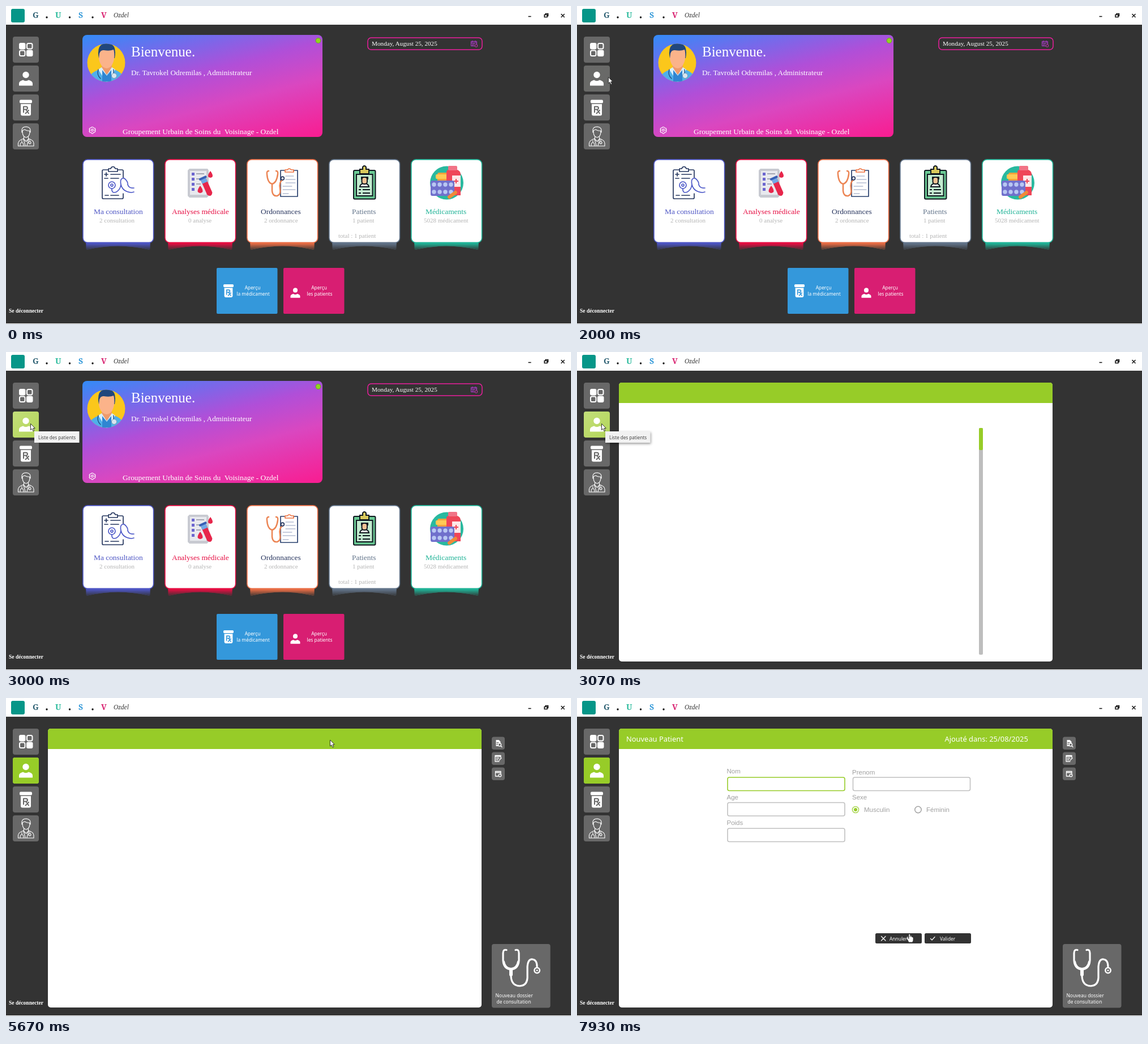
Animation, 998 px wide and 561 px high, one loop 8 s. Source, as an HTML page:

```html
<!DOCTYPE html>
<html lang="fr">
<head>
<meta charset="utf-8">
<title>Accueil patients</title>
<style>
html, body { margin: 0; width: 100%; height: 100%; overflow: hidden; background: #333; }
svg { display: block; width: 100%; height: 100%; }
text { white-space: pre; fill: #fff; }
.serif { font: 13.4px "Liberation Serif", serif; }
.head { font: 11.2px "Noto Serif", serif; fill: #97cc28; }
.sans { font: 8.4px "Noto Sans", sans-serif; }
.cell { font: 11px "Noto Sans", sans-serif; }
.title { font: 12.9px "Noto Sans", sans-serif; }
.label text { font: 11.5px "Liberation Sans", sans-serif; fill: #a0a0a0; }
.sub { font-size: 11px; fill: #b5b5b5; }
.brand { font: 900 14px "Noto Serif", serif; }
.line { fill: none; stroke-linecap: round; stroke-linejoin: round; }
.white { stroke: #fff; }
.box { fill: #686868; }
.green { fill: #97cc28; }
.field { fill: #fff; stroke: #c0c0c0; stroke-width: 1.6; }
</style>
</head>
<body>
<svg viewBox="0 0 998 561" preserveAspectRatio="none">
<defs>
  <linearGradient id="sky" gradientUnits="userSpaceOnUse" x1="170" y1="35" x2="243" y2="314">
    <stop offset="0" stop-color="#2b8ff9"/><stop offset=".24" stop-color="#7769ea"/>
    <stop offset=".43" stop-color="#b04fd8"/><stop offset=".65" stop-color="#da47c0"/><stop offset="1" stop-color="#f91c90"/>
  </linearGradient>
  <linearGradient id="pale" x2="1" y2="1"><stop stop-color="#c3de7a"/><stop offset="1" stop-color="#b3d65a"/></linearGradient>
  <linearGradient id="fade" x2="0" y2="1"><stop offset=".2" stop-color="#333" stop-opacity="0"/><stop offset="1" stop-color="#333" stop-opacity=".9"/></linearGradient>
  <clipPath id="face"><circle cx="177" cy="100" r="33.5"/></clipPath>
  <symbol id="person" viewBox="0 0 24 25" overflow="visible">
    <circle cx="12" cy="6" r="5.700"/><path d="M0 25V21Q0 17 7 15Q12 18.500 17 15Q24 17 24 21V25Z"/>
  </symbol>
  <symbol id="bottle" viewBox="0 0 22 28" overflow="visible">
    <g fill="#fff"><rect width="22" height="6" rx="2"/><path d="M2 7.500H20V25Q20 28 17 28H5Q2 28 2 25Z"/></g>
    <path d="M7 22V12H11Q14 12 14 14.500T11 17H7M11 17L16 24M16 18.500L10.500 24" class="line" stroke="currentColor" stroke-width="2"/>
  </symbol>
</defs>

<rect width="998" height="561" fill="#333"/>
<rect width="998" height="33" fill="#fff"/>
<rect y="560" width="998" height="1" fill="#fff"/>
<rect x="9" y="5" width="24" height="24" rx="3" fill="#069688"/>
<g class="brand">
  <text x="47" y="21" style="fill:#2c5f72">G</text><text x="87" y="21" style="fill:#25b99a">U</text>
  <text x="128" y="21" style="fill:#2f97d8">S</text><text x="168" y="21" style="fill:#d81e6e">V</text>
  <g fill="#111"><circle cx="72" cy="20" r="1.700"/><circle cx="112.500" cy="20" r="1.700"/><circle cx="153" cy="20" r="1.700"/></g>
</g>
<text x="190" y="20" class="serif" style="font-style:italic;font-size:11.500px;fill:#333">Ozdel</text>
<path d="M922.500 18.500h5M951 15.500h5v4h-5zM953 15v-1.500h4.500v4h-1.500M980.500 14l6 6m0-6l-6 6" fill="none" stroke="#111" stroke-width="1.500"/>

<g id="side">
  <g class="box"><rect x="12" y="54" width="46" height="46" rx="4"/><rect x="12" y="105" width="46" height="46" rx="4"/>
    <rect x="12" y="156" width="46" height="46" rx="4"/><rect x="12" y="207" width="46" height="46" rx="4"/></g>
  <rect id="hover" x="12" y="105" width="46" height="46" rx="4" fill="url(#pale)"/>
  <rect id="active" x="12" y="105" width="46" height="46" rx="4" class="green"/>
  <g fill="#fff"><rect x="23" y="65" width="11.500" height="11.500" rx="3"/><rect x="36" y="77.500" width="11.500" height="11.500" rx="3"/></g>
  <g class="line white" stroke-width="2"><rect x="37" y="66" width="9.500" height="9.500" rx="2.500"/><rect x="24" y="78.500" width="9.500" height="9.500" rx="2.500"/></g>
  <use href="#person" x="23" y="115.500" width="24" height="25" fill="#fff"/>
  <use href="#bottle" x="24" y="165.500" width="22" height="28" color="#686868"/>
  <g class="line white" stroke-width="1.100">
    <path d="M28 223V218Q29 213 36 213Q43 214 43 219V223M28 221Q31 218 33 218Q38 221 43 220M29 221Q29 231 35.500 232Q42 231 42 221M31.500 231V235L35.500 239L39.500 235V231"/>
    <path d="M31 234Q22 237 21.500 242V247H49V242Q49 237 40 234M31 235L34 246M40 235L37 246M28 237V241M25 246Q25 241 28 241T31 246M42 236V239"/><circle cx="42" cy="241" r="2"/>
  </g>
  <text x="5" y="541" class="serif" style="font-weight:bold;font-size:9.500px">Se déconnecter</text>
</g>

<g id="dashboard">
  <rect x="135" y="51" width="424" height="180" rx="8" fill="url(#sky)"/>
  <circle cx="551.500" cy="61" r="4.500" fill="#8fd61f" stroke="#6b9c32"/>
  <g clip-path="url(#face)">
    <circle cx="177" cy="100" r="34" fill="#fbc71b"/>
    <path d="M164 92Q159 67 177 65Q197 65 192 92Z" fill="#21477c"/>
    <path d="M169 100H187V114L178 124L169 114Z" fill="#ee9a6c"/>
    <path d="M165 84Q167 77 173 78Q183 80 190 77Q192 82 191 93Q188 109 178 110Q167 109 164 93Z" fill="#fbb38a"/>
    <path d="M142 136Q146 117 168 111L178 121L188 111Q209 117 212 136Z" fill="#4fb0ea"/>
    <path d="M163 112L169 108L178 122L187 108L193 112L178 136Z" fill="#d8effc"/>
    <path d="M170 113L178 123L186 113V134H170Z" fill="#2f86d2"/>
    <path d="M163 112Q160 122 167 128M190 112V120" class="line" stroke="#244c80" stroke-width="1.400"/>
    <circle cx="191" cy="123" r="4.500" fill="#d8e6f0" stroke="#8097ae"/>
  </g>
  <g class="serif">
    <text x="221" y="88.500" style="font-size:25px">Bienvenue.</text>
    <text x="221" y="122" style="font-size:13.200px">Dr. Tavrokel Odremilas , Administrateur</text>
    <text x="206" y="226">Groupement Urbain de Soins du  Voisinage - Ozdel</text>
  </g>
  <g class="line white" stroke-width="1.200"><circle cx="152.500" cy="219" r="1.800"/><path d="M150.500 214.500L151.500 213.500H153.500L154.500 215L157 215.500L158 218L156.500 219L158 220.500L156.500 223L154.500 223L153.500 225H151.500L150.500 223L148 223L147 220.500L148.500 219L147 217.500L148 215.500Z"/></g>
  <rect x="639" y="56" width="202" height="21" rx="6" fill="#333" stroke="#ea1e9d" stroke-width="1.500"/>
  <text x="646" y="70" class="serif" style="font-size:11.200px">Monday, August 25, 2025</text>
  <path d="M821.500 62.500h10v8h-10zM821.500 65h10M824 61v3M829 61v3M823 67h5M823 69h3" fill="none" stroke="#b13ad0"/><circle cx="830.500" cy="70" r="2.300" fill="#333" stroke="#d030b8"/>
  <g id="cards"></g>
  <g id="icons">
    <g class="line" stroke="#26375f" stroke-width="1.700">
      <path d="M181 289H172Q170 289 170 291V338Q170 340 172 340H205Q207 340 207 338V331M197 289H205Q207 289 207 291V303M181 292V287H185Q186 283.500 189 283.500T193 287H197V292ZM174 297h6M177 294v6M185 297h17M174 304h6M185 304h14M175 334h6M185 334h14"/>
      <path d="M187 322V325Q188 331 195 328Q202 324 203 315M203 315Q201 305 206 304L209 304M203 315Q206 328 222 329L226 328M209 304Q216 310 215 315Q217 322 226 321" stroke="#4c58c8"/><circle cx="187" cy="316" r="6" stroke="#4c58c8"/><circle cx="187" cy="316" r="2" stroke="#4c58c8"/>
    </g>
    <g><path d="M324 287H356L358 290V335L355 338H324L321 335V290Z" fill="#c8cad1"/><rect x="325" y="291" width="29" height="42" fill="#e8e9ee"/>
      <path d="M328 294h5v5h-5zM328 303h5v5h-5zM328 312h5v5h-5zM328 321h5v5h-5z" fill="#6d66cf"/>
      <path d="M336 296h14M336 305h10M336 314h8" stroke="#a5a7b3" stroke-width="2"/>
      <g transform="rotate(-24 355 320)"><path d="M350 302h10v30q-5 8-10 0z" fill="#e7264b"/><path d="M350 302h10v9h-10z" fill="#70a9e6"/><rect x="348" y="300" width="14" height="4" rx="1" fill="#3860b6"/></g>
      <path d="M361 291q8 11 0 12q-8-1 0-12M343 317q9 12 0 13q-9-1 0-13" fill="#e7264b"/></g>
    <g class="line" stroke-width="1.700"><path d="M492 290H485V336H515V290H508" stroke="#29406e"/><path d="M493 293V289H497Q500 285 504 289H508V293Z" stroke="#ed7341"/>
      <path d="M494 300h14M494 306h17M494 312h17M489 318h16M489 324h22M489 331h10" stroke="#8d9abb" stroke-width="1"/>
      <path d="M464 291Q460 291 461 297Q462 312 470 314Q478 312 480 297Q481 291 477 291M470 314V326Q471 336 479 335Q486 333 484 322Q482 311 488 307" stroke="#ec8554" stroke-width="2.500"/><circle cx="488.500" cy="304" r="2.800" stroke="#26375f"/></g>
    <g stroke="#101820" stroke-width="2"><rect x="614" y="290" width="38.500" height="50.500" rx="2" fill="#6ac994"/><rect x="619" y="297" width="28.500" height="38" fill="#c3ecd0"/><path d="M625 296V288H630V284Q633 280 636 284V288H641V296Z" fill="#d9c95c"/>
      <path d="M625 319Q626 313 633 313Q640 313 641 319Z" fill="#f6f6ee"/><rect x="628.500" y="302" width="9.500" height="12" rx="4" fill="#f0c294"/><path d="M628 306V302H639V306" fill="none"/><path d="M623 324h4M630 324h13M623 330h4M630 330h13" fill="none"/></g>
    <g><circle cx="778.500" cy="312" r="29.500" fill="#29b99f"/><rect x="762" y="294" width="22" height="25" rx="3" fill="#f5a23c"/><rect x="759" y="297" width="23" height="8" rx="2" fill="#ffca55"/><path d="M778 293Q778 289 782 289H797Q803 291 803 297V334H778Z" fill="#ef4658"/><rect x="781" y="282" width="16" height="8" rx="2" fill="#f17386"/><rect x="788" y="299" width="15" height="20" fill="#ffe8e8"/><path d="M791 309h8M795 305v8" stroke="#ef4658" stroke-width="2"/>
      <rect x="750" y="308" width="42" height="27" rx="3" fill="#7070cc"/><g id="pills" fill="#b8c7f3"></g><path d="M783 337l11-8" class="line" stroke="#f08a38" stroke-width="6"/></g>
  </g>
  <rect x="372" y="462" width="107.500" height="81" rx="2" fill="#3498db"/><rect x="490" y="462" width="107.500" height="81" rx="2" fill="#d81e72"/>
  <use href="#bottle" x="384" y="491" width="18" height="23" color="#3498db"/><use href="#person" x="502.500" y="497" width="17" height="18" fill="#fff"/>
  <g class="sans" text-anchor="middle"><text x="435.500" y="500">Aperçu</text><text x="436.500" y="511">la médicament</text><text x="553" y="500">Aperçu</text><text x="554" y="511">les patients</text></g>
</g>

<g id="page">
  <rect x="74" y="54" width="766" height="492" rx="5" fill="#fff"/>
  <path d="M74 90V59Q74 54 79 54H835Q840 54 840 59V90Z" class="green"/>
  <g id="scroll"><rect x="710" y="134" width="7" height="400" rx="2" fill="#bebebe"/><rect x="710" y="134" width="7" height="39" rx="2" class="green"/></g>
</g>

<g id="tools">
  <g class="box"><rect x="858" y="68.500" width="23" height="22.500" rx="4"/><rect x="858" y="95.500" width="23" height="22.500" rx="4"/><rect x="858" y="122.500" width="23" height="22.500" rx="4"/><rect x="858" y="434" width="103.500" height="112.500" rx="4"/></g>
  <path d="M865.500 74h5l3 3v8h-8z" fill="#fff"/><g class="line white" stroke-width="1.300">
    <path d="M867 79h3M867 82h3" stroke="#686868"/><circle cx="872" cy="82.500" r="2.600" fill="#686868"/><path d="M874 84.500l2 2M874 106v-4.500h-10v10.500h7M864 103h10M866 106h5M866 109h3M871 110l4-4M874 135v-5.500h-9.500v8.500h5M864.500 131.500h9.500"/><circle cx="872.500" cy="136.500" r="2.300"/></g>
  <g class="line white"><path d="M884 444.500Q878 443 878 450V463Q879 478 892 479Q905 478 906 463V450Q906 443 900 444.500M892 480V491Q893 508 908 508Q922 507 921 489V474Q922 460 930 461Q938 462 938 474" stroke-width="3.200"/><path d="M892 480v8" stroke-width="6"/><path d="M879 465Q881 477 892 478Q903 477 905 465" stroke-width="4"/><circle cx="938" cy="480.500" r="4.700" stroke-width="2.500"/></g><circle cx="938" cy="480.500" r="1.500" fill="#fff"/>
  <g class="sans"><text x="864.500" y="528">Nouveau dossier</text><text x="866.500" y="539">de consultation</text></g>
</g>

<g id="list">
  <text x="87" y="76.500" class="title">Liste des patients</text>
  <use href="#person" x="532" y="65" width="13" height="12.500" fill="#fff"/><text x="549" y="74" class="sans">Nouveau patient</text>
  <path d="M622.500 59V83" stroke="#fff"/><rect x="633" y="60" width="196" height="22" rx="11" fill="#fff"/>
  <g class="line" stroke="#b0b0b0" stroke-width="1.600"><circle cx="643" cy="69.500" r="3.300"/><path d="M645.500 72l3.500 3.500"/></g>
  <text x="658" y="73.500" class="sans" style="fill:#c2c2c2">Nom uniquement</text>
  <g id="rows">
    <text x="88" y="119.500" class="title" style="fill:#97cc28">1 résultats</text>
    <rect x="74" y="161" width="766" height="29" class="green"/><use href="#person" x="84" y="171" width="9" height="9.500" fill="#61733c"/>
    <g id="table"></g>
  </g>
</g>

<g id="form">
  <text x="87" y="76.500" class="title">Nouveau Patient</text><text x="649.500" y="76.500" class="title">Ajouté dans: 25/08/2025</text>
  <g class="label"><text x="264.500" y="133">Nom</text><text x="486" y="134.500">Prenom</text><text x="264.500" y="179">Age</text><text x="486" y="179">Sexe</text><text x="264.500" y="224">Poids</text><text x="507" y="201">Musculin</text><text x="617" y="201">Féminin</text></g>
  <g class="field"><rect x="266" y="140" width="207" height="23.500" rx="3" style="stroke:#97cc28"/><rect x="487.500" y="140" width="207" height="23.500" rx="3"/><rect x="266" y="184.500" width="207" height="23.500" rx="3"/><rect x="266" y="230" width="207" height="23.500" rx="3"/></g>
  <circle cx="492" cy="197" r="5.600" fill="#fff" stroke="#a8d550" stroke-width="1.500"/><circle cx="492" cy="197" r="3" class="green"/><circle cx="602.500" cy="197" r="5.700" fill="#fff" stroke="#a0a0a0" stroke-width="1.500"/>
  <rect x="527" y="415" width="82" height="18" rx="2.500" fill="#333"/><rect x="614" y="415" width="82" height="18" rx="2.500" fill="#333"/>
  <path d="M537.500 420.500l7.500 7.500m0-7.500l-7.500 7.500M624.500 424.500l2.500 2.500 5-5.500" class="line white" stroke-width="1.200"/>
  <text x="552" y="427.500" class="sans">Annuler</text><text x="641" y="427.500" class="sans">Valider</text>
  <rect id="caret" x="274" y="145" width="1" height="11.500" fill="#222"/>
</g>

<g id="tip"><rect x="50" y="140" width="79.500" height="20" fill="#f2f2f2"/><text x="57" y="153.500" class="sans" style="font-size:8.100px;fill:#444">Liste des patients</text></g>
<g id="cursor">
  <path id="arrow" d="M.5 .5V11.500L3 9.200L5 13.500L6.800 12.700L5 8.500H8.300Z" fill="#fff" stroke="#222" stroke-width=".9"/>
  <path id="hand" d="M0 1Q1.300-.5 2.400 1V5.500Q4-.1 5 5.500L6.800 5.800L8 7Q8.500 12 6.500 15H0Q-1.500 11-3.500 9Q-3-.1 0 9Z" fill="#fff" stroke="#333" stroke-width=".7"/>
</g>
</svg>
<script>
const el = id => document.getElementById(id);
const LOOP = 8000, FPS = 15;

const cards = [
  ['#4d55c4', 'Ma consultation', 155, '2 consultation', 165],
  ['#e60d42', 'Analyses médicale', 293, '0 analyse', 322],
  ['#e96d45', 'Ordonnances', 450, '2 ordonnance', 456, '#29365f'],
  ['#62748a', 'Patients', 611, '1 patient', 612],
  ['#20b397', 'Médicaments', 741, '5028 médicament', 738]
];
el('cards').innerHTML = cards.map(([color, name, nameX, note, noteX, ink = color], i) => {
  const x = 135 + 145 * i;
  const ribbon = `M${x + 6} 416L${x + 7} 430Q${x + 63} 417 ${x + 119} 430L${x + 120} 416Z`;
  return `<path d="${ribbon}" fill="${color}"/><path d="${ribbon}" fill="url(#fade)"/>
    <rect x="${x + 0.9}" y="270.900" width="124.700" height="146.400" rx="8" fill="#fff" stroke="${color}" stroke-width="1.600"/>
    <g class="serif"><text x="${nameX}" y="367" style="fill:${ink}">${name}</text>
    <text x="${noteX}" y="382" class="sub">${note}</text></g>`;
}).join('') + '<g class="serif"><text x="587" y="409" class="sub">total : 1 patient</text></g>';

el('pills').innerHTML = Array.from({ length: 8 }, (_, i) =>
  `<circle cx="${756 + i % 4 * 10}" cy="${315 + (i >> 2) * 13}" r="3.700"/>`).join('');

const columns = [['Nom', 'Tarsim'], ['Prenom', 'olvadir'], ['Age', '35'], ['Sexe', 'Musculin'], ['Poids', '70'], ['ajouté_dans', '13/03/2024']];
el('table').innerHTML = columns.map(([name, value], i) =>
  `<text x="${107 + 123.2 * i}" y="150.500" class="head">${name}</text><text x="${106 + 123.1 * i}" y="179.500" class="cell">${value}</text>`).join('');

// time, x, y
const path = [
  [200, 1, 550], [600, 41, 394], [800, 41, 394], [1200, 118, 230], [1470, 104, 113],
  [1600, 104, 113], [2000, 55, 125], [2470, 43, 126], [3800, 43, 126], [3930, 200, 119],
  [4070, 424, 134], [4200, 424, 134], [4400, 511, 93], [4700, 560, 79], [5000, 572, 73.5],
  [6200, 572, 73.5], [6730, 652, 323], [7060, 652, 323], [7600, 602, 397], [7860, 586, 416]
];

function pointAt(t) {
  const i = path.findIndex(p => p[0] > t);
  if (i < 0) return path[path.length - 1].slice(1);
  if (i === 0) return path[0].slice(1);
  const [t0, x0, y0] = path[i - 1], [t1, x1, y1] = path[i];
  const k = (t - t0) / (t1 - t0);
  return [x0 + (x1 - x0) * k, y0 + (y1 - y0) * k];
}

const ramp = (t, from, to) => Math.min(1, Math.max(0, (t - from) / (to - from)));
const show = (id, on) => { el(id).style.display = on ? '' : 'none'; };

function draw(ms) {
  const t = Math.floor((ms + 4) * FPS / 1000) * 1000 / FPS + 4;
  const [x, y] = pointAt(t);
  const onButton = t > 7000 && y >= 415;

  show('dashboard', t < 3070);
  show('page', t >= 3070);
  show('scroll', t >= 3070 && t < 3200);
  show('tools', t >= 3200);
  show('list', t >= 3130 && t < 5670);
  show('rows', t >= 3200);
  show('form', t >= 5730);
  show('caret', t < 5930 || Math.floor((t - 5930) / 333.4) % 2 === 1);
  show('tip', t >= 2470 && t < 3330);
  el('tip').style.opacity = t < 2530 ? 0.8 : 1;
  el('tip').style.filter = t >= 3070 ? 'drop-shadow(1px 2px 2px #0006)' : '';
  el('hover').style.opacity = ramp(t, 2000, 2330);
  el('active').style.opacity = ramp(t, 3100, 3400);

  show('cursor', t >= 200);
  show('arrow', !onButton);
  show('hand', onButton);
  el('cursor').setAttribute('transform', `translate(${x} ${y})`);
}

function tick() {
  draw(performance.now() % LOOP);
  requestAnimationFrame(tick);
}
tick();
</script>
</body>
</html>
```
